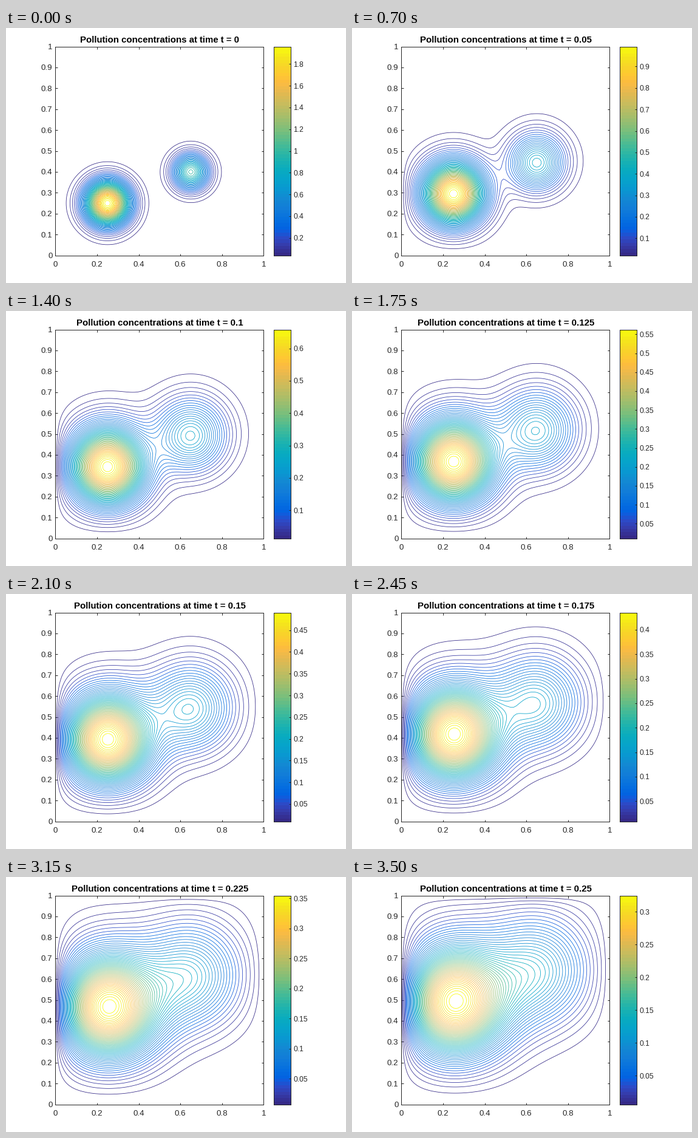
Write a matplotlib script that moves like this. It is 560 px wide and 420 px high and loops after 3850 ms.

```python
import numpy as np
import matplotlib.pyplot as plt
from matplotlib.animation import FuncAnimation
from matplotlib.colors import LinearSegmentedColormap, Normalize

WIDTH, HEIGHT, DPI = 560, 420, 100
PX = 72 / DPI
INK = "0.15"
FRAMES, INTERVAL = 11, 350

CELLS = 100
DIFFUSION, SPEED = 0.05, 1.0
DT, STEPS_PER_FRAME = 0.005, 5
LEVELS = 50
CONTOUR_WIDTH = 0.8 * PX

STOPS = {0: "#352a87", 3: "#353dad", 5: "#2c4ac7", 7: "#0f5cdd", 8: "#0363e1",
         10: "#046de0", 14: "#127dd8", 17: "#1389d3", 20: "#0998d1",
         23: "#06a4ca", 26: "#0aacbe", 29: "#1db3af", 32: "#38b99e",
         35: "#59bd8c", 38: "#7cbf7b", 42: "#a5be6b", 46: "#c8bc5d",
         50: "#e9b94e", 52: "#f8bb44", 53: "#fdbe3d", 55: "#fec832",
         58: "#f7d826", 60: "#f5e41d", 63: "#f9fb0e"}
CMAP = LinearSegmentedColormap.from_list(
    "blue_yellow", [(i / 63, c) for i, c in STOPS.items()], N=64)

plt.rcParams["font.family"] = "Liberation Sans"
grid = np.linspace(0, 1, CELLS + 1)


def initial_field():
    x, y = np.meshgrid(grid, grid)
    field = (2 * np.exp(-100 * ((x - 0.25) ** 2 + (y - 0.25) ** 2))
             + np.exp(-150 * ((x - 0.65) ** 2 + (y - 0.4) ** 2)))
    return field[1:-1, 1:-1]


def solve():
    """Implicit advection-diffusion with zero walls; sine modes across x."""
    h, n = 1 / CELLS, CELLS - 1
    modes = np.arange(1, CELLS)
    sines = np.sqrt(2 / CELLS) * np.sin(np.pi * np.outer(modes, modes) / CELLS)
    decay = 4 * DIFFUSION / h**2 * np.sin(np.pi * modes / (2 * CELLS)) ** 2

    up, down = np.eye(n, k=1), np.eye(n, k=-1)
    along_y = (SPEED * (up - down) / (2 * h)
               - DIFFUSION * (up + down - 2 * np.eye(n)) / h**2)
    system = np.eye(n) + DT * (decay[:, None, None] * np.eye(n) + along_y)
    advance = np.linalg.matrix_power(np.linalg.inv(system), STEPS_PER_FRAME)

    spectrum = initial_field() @ sines
    fields = []
    for _ in range(FRAMES):
        fields.append(np.pad(spectrum @ sines, 1))
        spectrum = np.einsum("kij,jk->ik", advance, spectrum)
    return fields


def add_axes(left, right, top=30, bottom=374):
    """Axes whose frame covers the given pixel columns and rows."""
    centre = 0.45  # just under half, so snapping never rounds up a pixel
    axes = fig.add_axes([(left + centre) / WIDTH,
                         (HEIGHT - 1 - bottom + centre) / HEIGHT,
                         (right - left) / WIDTH, (bottom - top) / HEIGHT])
    for spine in axes.spines.values():
        spine.set(linewidth=PX, edgecolor=INK)
    axes.tick_params(direction="in", length=3.5 * PX, width=PX,
                     color=INK, labelcolor=INK)
    return axes


def nice_ticks(low, high):
    steps = (m * 10.0**e for e in range(-4, 1) for m in (1, 2, 5))
    step = next(s for s in steps if (high - low) / s <= 11.5)
    return step * np.arange(np.ceil(low / step), np.floor(high / step) + 1)


def set_ticks(axis, values):
    axis.set_ticks(values, [f"{v:g}" for v in np.round(values, 6)])


fields = solve()
fig = plt.figure(figsize=(WIDTH / DPI, HEIGHT / DPI), dpi=DPI, facecolor="white")

ax = add_axes(81, 424)
ax.tick_params(top=True, right=True, labelsize=13.33 * PX)
ax.tick_params(axis="x", pad=9.2 * PX)
ax.tick_params(axis="y", pad=5 * PX)
set_ticks(ax.xaxis, np.arange(6) / 5)
set_ticks(ax.yaxis, np.arange(11) / 10)

bar = add_axes(441, 469)
bar.yaxis.tick_right()
bar.tick_params(axis="y", labelsize=12 * PX, pad=4 * PX)
bar.set_xticks([])
ramp = bar.imshow(np.arange(64)[:, None], cmap=CMAP, origin="lower",
                  aspect="auto", interpolation="nearest")

title = fig.text(253.5 / WIDTH, 1 - 24 / HEIGHT, "", ha="center", va="baseline",
                 size=15 * PX, weight="bold", color="black")


def draw(frame):
    field = fields[frame]
    levels = np.linspace(field.min(), field.max(), LEVELS + 2)[1:-1]
    low, high = levels[0], levels[-1]

    for old in list(ax.collections):
        old.remove()
    ax.contour(grid, grid, field, levels=levels, cmap=CMAP,
               norm=Normalize(low, high), linewidths=CONTOUR_WIDTH,
               antialiased=True)
    ax.set(xlim=(0, 1), ylim=(0, 1))

    ramp.set_extent((0, 1, low, high))
    set_ticks(bar.yaxis, nice_ticks(low, high))
    bar.set(xlim=(0, 1), ylim=(low, high))

    time = frame * STEPS_PER_FRAME * DT
    title.set_text(f"Pollution concentrations at time t = {time:g}")


anim = FuncAnimation(fig, draw, frames=FRAMES, interval=INTERVAL,
                     repeat=True, repeat_delay=0, blit=False)
plt.show()
```
